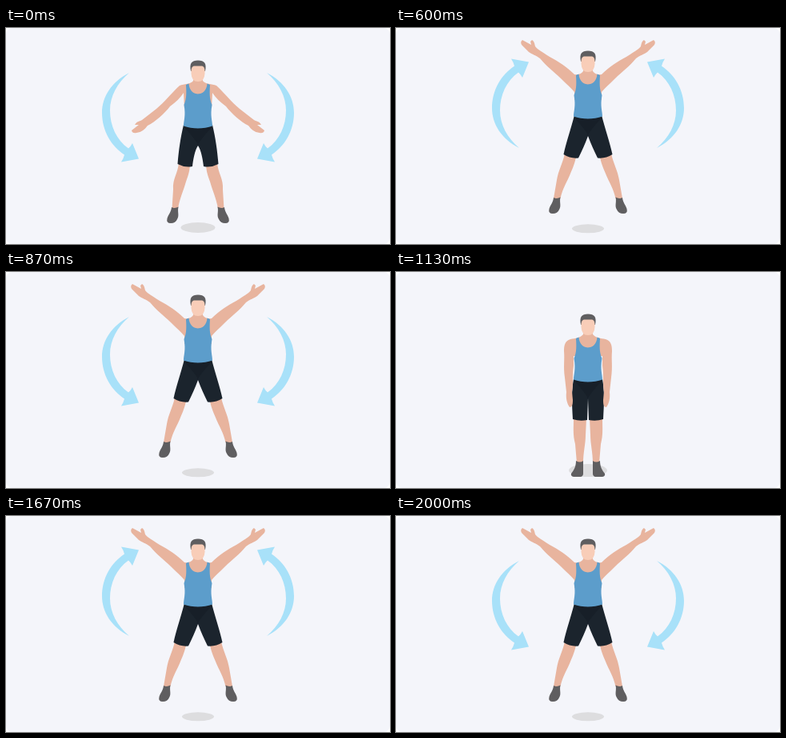
An HTML page for the animation above (2070 ms loop, 480 px wide and 270 px high).

```html
<!DOCTYPE html>
<html lang="en">
<head>
<meta charset="utf-8">
<title>Jumping jack</title>
<style>
html, body { margin: 0; width: 100%; height: 100%; overflow: hidden; background: #fff; }
svg { display: block; width: 100vw; height: 100vh; }
</style>
</head>
<body>
<svg id="stage" viewBox="0 0 480 270"></svg>
<script>
const stage = document.getElementById('stage');
const LOOP = 2070;
// Moments at which the next step of the exercise begins
const CUTS = [70, 270, 470, 730, 930, 1130, 1400, 1600, 1800];
// Steps in order: [pose, arrow]
const STEPS = [['stand', ''], ['mid', 'up'], ['high', 'up'], ['high', 'down'], ['mid', 'down']];
const SKIN = '#e8b49e', FACE = '#f8cdb8', GREY = '#5f5e60';

// Left halves of the body; dy moves head and torso
const MID_SHOE = 'M207 224Q211 226 215.5 223.5C214 230 217 234 214 239Q212 244 206 244Q200 244 201.5 238C203 233 206.5 230 207 224Z';
const POSES = {
  stand: {
    dy: 12, shadow: [248, 24, 8],
    arm: 'M241 72H234V78C231 82 224 83 218 84C211 86 210 92 210 99C211 110 209 118 211 132L213 150C212 158 214 165 217 169C220 169 221 166 221 160L220 150C222 140 220 130 222 117V105H241Z',
    shin: 'M222 183C222 197 221 203 224 215L226 239H234C234 225 237 215 237 204L238 183Z',
    shoe: 'M225 236Q230 239 234 236V252Q234 255 231 256H222Q218 255 219 252C222 248 225 244 225 236Z',
    shorts: 'M222 134H241V158H240L239 185Q230 187 221 184C220 165 219 150 222 134Z'
  },
  mid: {
    dy: 0, shadow: [249.5, 21.5, 6.5],
    arm: 'M241 60H234V66C232 70 222 70 217 72C206 82 198 93 188 101L170 115C166 117 163 117 161 121L166 121L157 128Q158 132 163 131C170 130 173 127 177 122C187 117 198 107 205 98C212 93 218 87 222 81L223 100H241Z',
    shin: 'M216 168C215 182 208 188 209 202L207.5 226H215C217 213 222 203 225 192C228 184 230 178 230 168Z',
    shoe: MID_SHOE,
    shorts: 'M222 121H241V147H240C236 153 234 164 233 173Q224 175 214.5 170C216 152 218 138 222 121Z'
  },
  high: {
    dy: -12, shadow: [250.8, 20, 5.5],
    arm: 'M241 48H234V54C231 58 227 59 223 58C213 48 203 42 192 36C183 30 177 27 174 23C173 18 172 16 170 15L168 17L169 21L158 15Q155 17 157 21L166 30C170 33 175 34 180 38C188 48 198 55 206 63C213 70 219 75 223 80V90H241Z',
    shin: 'M211 157C208 170 203 178 201 190L197 213H205.5C208 201 214 192 218 182C221 175 224 168 226 157Z',
    shoe: MID_SHOE, shoeMove: '-10 -12',
    shorts: 'M223 109H241V135H240C236 146 232 154 228 162.5Q218 163.5 209.5 158C213 142 218 128 223 109Z'
  }
};
const ARROW = 'M154 56C132 67 120 86 120 106C120 128 131 147 148 158.5Q147 163 144 167.5L166 163.5L158 144Q156 148 153 150.5C138 140 130 122 130 103C130 85 139 69 154 56Z';

const path = (d, fill, move = '0 0') => `<path d="${d}" fill="${fill}" transform="translate(${move})"/>`;
const mirror = half => half + `<g transform="matrix(-1 0 0 1 480 0)">${half}</g>`;
const group = (id, body) => `<g id="${id}" visibility="hidden">${body}</g>`;

function figure(p) {
  const shift = `0 ${p.dy}`;
  const [y, rx, ry] = p.shadow;
  return `<ellipse cx="240" cy="${y}" rx="${rx}" ry="${ry}" fill="#dddddf"/>` +
    mirror(
      path(p.shin, SKIN) +
      path(p.shoe, GREY, p.shoeMove) +
      path(p.shorts, '#1b242d') +
      path('M223 124H241V147C236 138 230 132 223 124Z', '#171f28', shift) +
      path(p.arm, SKIN) +
      path('M225 71L228.5 69.5C229 78 234 82.5 241 82.5V125.5Q230 125.5 222 122.5C222 116 225 110 222.5 96C226 88 225.5 80 225 71Z', '#5c9dcb', shift)
    ) +
    path('M231 54C229 44 232 40.5 240 40.5C248 40.5 251 44 249 54Z', GREY, shift) +
    path('M231.5 53Q232 48 235 47.5H245Q248 48 248.5 53V57Q248 67 240 67Q232 67 231.5 57Z', FACE, shift);
}

const arrows = mirror(path(ARROW, '#a8e1f9'));
stage.innerHTML = '<rect width="480" height="270" rx="8" fill="#f4f5fa"/>' +
  group('down', arrows) +
  group('up', `<g transform="matrix(1 0 0 -1 0 206)">${arrows}</g>`) +
  Object.keys(POSES).map(name => group(name, figure(POSES[name]))).join('');

const layers = [...stage.querySelectorAll('g[id]')];

function draw(now) {
  const t = now % LOOP;
  const passed = CUTS.filter(cut => cut <= t).length;
  const shown = STEPS[(passed + 4) % STEPS.length];
  for (const layer of layers) {
    layer.setAttribute('visibility', shown.includes(layer.id) ? 'visible' : 'hidden');
  }
}

const start = performance.now();
function tick() {
  draw(performance.now() - start);
  requestAnimationFrame(tick);
}
tick();
</script>
</body>
</html>
```
